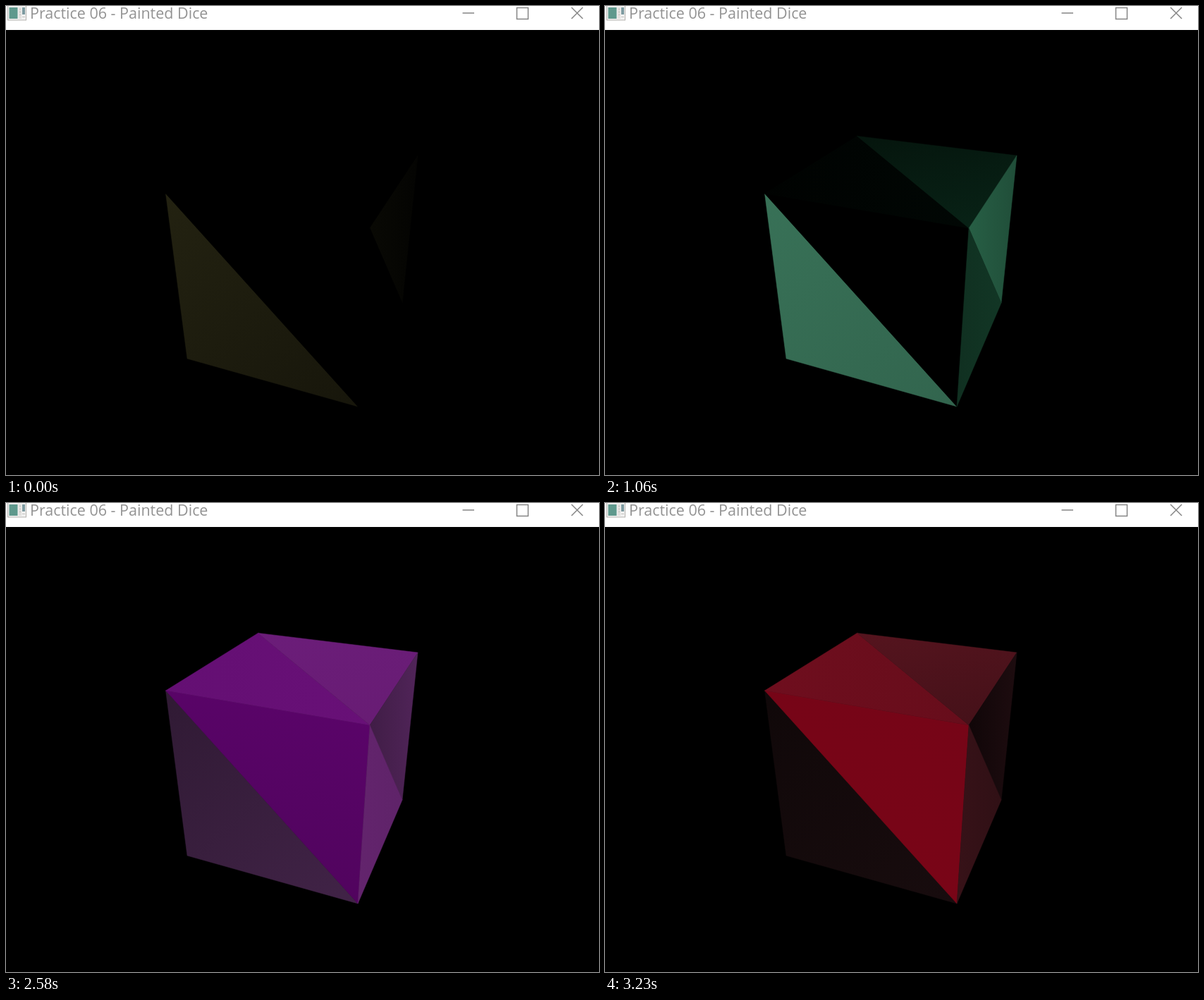
Write an HTML page with a canvas that moves like this. It is 841 px wide and 665 px high and loops after 3.35 s.

```html
<!DOCTYPE html>
<html lang="en">
<head>
<meta charset="utf-8">
<title>Practice 06 - Painted Dice</title>
<style>
  html, body { margin: 0; width: 100%; height: 100%; overflow: hidden; background: #000; }
  canvas, svg { position: absolute; left: 0; top: 0; display: block; }
  text { font: 21.5px "Open Sans", "Noto Sans", sans-serif; fill: #939393; }
</style>
</head>
<body>
<canvas id="scene" width="841" height="665"></canvas>
<svg width="841" height="34" viewBox="0 0 841 34">
  <rect width="841" height="34" fill="#fff"/>
  <rect x="2.5" y="-1" width="26" height="21" fill="#f1f1f0" stroke="#b4b1ae"/>
  <rect x="4.5" y="2" width="12" height="16" fill="#5f998d"/>
  <rect x="18" y="2" width="4" height="16" fill="#e2e0de"/>
  <rect x="23" y="2" width="4" height="10" fill="#7d9aa0"/>
  <path d="M19 4.5h2M19 8.5h2M19 12.5h2M23 15.5h4" stroke="#c6c3c0"/>
  <text x="34" y="18">Practice 06 - Painted Dice</text>
  <path d="M647.5 10H664M724.5 2.5h16v16h-16zM802 2l16 16M818 2l-16 16"
        fill="none" stroke="#858585" stroke-width="1.5"/>
</svg>
<script>
const LOOP = 3350;
const run = (from, to, n) => Array.from({ length: n }, (_, i) => from + (to - from) * i / (n - 1));
const steps = [0, 260, 610, 710, 910, 1060, 1210, 1310, 1610, 1710,
  ...run(1860, 2380, 11), 2480, 2580, ...run(2730, 3230, 6)];

const A = [226.5, 266], B = [257, 500], C = [499, 568], D = [516, 315],
      E = [562, 421], F = [584, 212], G = [357.5, 184.4];

// A face shines most when the light's hue reaches its peak, one at each end of its shading line.
const faces = [
  { pts: [A, B, C], line: [A, C], peaks: [184, 204], grey: .49, low: 15 },
  { pts: [A, D, C], line: [[516, 300], [440, 555]], peaks: [334, 348], grey: .04, low: 0 },
  { pts: [A, G, D], line: [A, [516, 266]], peaks: [318, 305], grey: .13, low: 0 },
  { pts: [G, F, D], line: [G, [389, 341]], peaks: [284, 269], grey: .24, low: 0 },
  { pts: [D, F, E], line: [D, [582, 315]], peaks: [209, 227], grey: .41, low: 3 },
  { pts: [D, E, C], line: [[499, 421], E], peaks: [255, 249], grey: .33, low: 0 }
];
const HIGH = 121;

const ctx = document.getElementById("scene").getContext("2d");

function brightness(hue, peak, low) {
  const turn = Math.min(180, Math.abs(hue - peak)) * Math.PI / 180;
  return low + (HIGH - low) * (1 + Math.cos(turn)) / 2;
}

function color(hue, value, grey) {
  const channel = n => {
    const k = (n + hue / 60) % 6;
    const s = Math.max(0, Math.min(k, 4 - k, 1));
    return Math.round(value * (1 - (1 - grey) * s));
  };
  return `rgb(${channel(5)},${channel(3)},${channel(1)})`;
}

function draw(t) {
  const hue = 56 + t * .0912;
  ctx.fillStyle = "#000";
  ctx.fillRect(0, 0, 841, 665);
  ctx.lineWidth = .5;
  ctx.lineJoin = "round";
  for (const { pts, line, peaks, grey, low } of faces) {
    const paint = ctx.createLinearGradient(...line[0], ...line[1]);
    peaks.forEach((p, i) => paint.addColorStop(i, color(hue, brightness(hue, p, low), grey)));
    ctx.fillStyle = ctx.strokeStyle = paint;
    ctx.beginPath();
    pts.forEach(p => ctx.lineTo(...p));
    ctx.closePath();
    ctx.fill();
    ctx.stroke();
  }
}

const origin = performance.now();
function tick() {
  const t = (performance.now() - origin) % LOOP;
  draw(steps.findLast(s => s <= t));
  requestAnimationFrame(tick);
}
tick();
</script>
</body>
</html>
```
